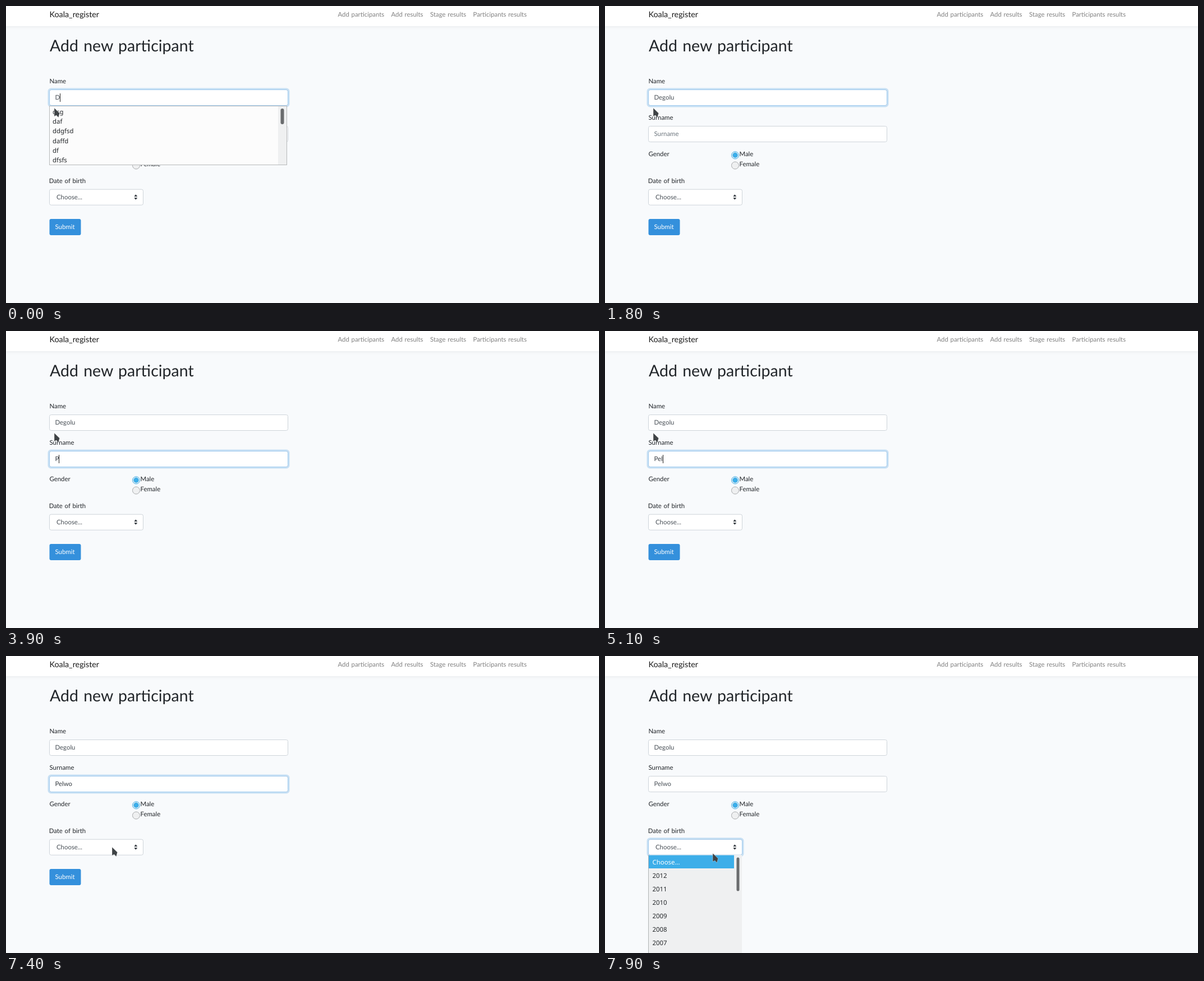
An HTML page for the animation above (8000 ms loop, 1057x530 px).

```html
<!DOCTYPE html>
<html lang="en">
<head>
<meta charset="utf-8">
<title>Add new participant</title>
<style>
html, body { margin: 0; width: 100%; height: 100%; overflow: hidden; background: #f8fafc; }
svg { display: block; }
text { font: 11.4px Lato, sans-serif; word-spacing: .07em; fill: #212529; white-space: pre; text-rendering: geometricPrecision; }
.brand { font-size: 14.3px; fill: #191919; }
.title { font-size: 28.5px; }
.nav text { fill: #808080; }
.sys text { font-family: "Noto Sans", "Open Sans", sans-serif; fill: #232629; }
.box { fill: #fff; stroke: #ced4da; }
.value { fill: #495057; }
.white, .sys .white { fill: #fff; }
.ring { fill: none; stroke: #a1cbef; }
.glow { fill: none; stroke: #3490dc; stroke-opacity: .25; stroke-width: 2.5; }
</style>
</head>
<body>
<svg width="1057" height="530" viewBox="0 0 1057 530">
  <rect width="1057" height="530" fill="#f8fafc"/>
  <rect width="1057" height="36" fill="#fff" style="filter:drop-shadow(0 2px 2px rgba(0,0,0,.05))"/>
  <text class="brand" x="77.5" y="20">Koala_register</text>
  <g class="nav">
    <text x="591.5" y="19">Add participants</text>
    <text x="686.5" y="19">Add results</text>
    <text x="756" y="19">Stage results</text>
    <text x="832.5" y="19">Participants results</text>
  </g>
  <text class="title" x="78" y="81">Add new participant</text>

  <text x="77.5" y="138">Name</text>
  <text x="77.5" y="202.5">Surname</text>
  <text x="77.5" y="267.5">Gender</text>
  <text x="239.5" y="267.5">Male</text>
  <text x="239.5" y="285.5">Female</text>
  <text x="76.7" y="315.5">Date of birth</text>
  <circle cx="232" cy="266.3" r="6.5" fill="#eff0f1" stroke="#3daee9"/>
  <circle cx="232" cy="266.3" r="4.7" fill="#3daee9"/>
  <circle cx="232" cy="284.5" r="6.5" fill="#eff0f1" stroke="#a9abad"/>

  <g id="fields"></g>
  <text class="value" id="name" x="87.5" y="167"></text>
  <text class="value" id="surname" x="87.5" y="232"></text>
  <text class="value" x="90" y="345">Choose...</text>
  <path d="M228.3 340L231.3 336.3L234.3 340ZM228.3 342L231.3 345.7L234.3 342Z" fill="#343a40"/>
  <rect id="caret" width="1" height="15" fill="#222"/>

  <rect x="77.5" y="380" width="56" height="29" rx="3" fill="#3490dc"/>
  <text class="white" x="87.5" y="398">Submit</text>

  <g class="sys" id="hints">
    <rect x="77.5" y="178.5" width="423" height="105" fill="#fcfcfc" stroke="#b7b9ba"/>
    <rect x="485" y="179" width="15" height="104" fill="#eff0f1"/>
    <rect x="489.5" y="183" width="6" height="28" rx="3" fill="#6a6c6e"/>
  </g>
  <g class="sys" id="years">
    <rect x="77" y="355" width="167" height="176" fill="#eff0f1"/>
    <rect x="77" y="355" width="1" height="176" fill="#b0b3b5"/>
    <rect x="78" y="355.5" width="152" height="23.5" fill="#3daee9"/>
    <rect x="234.5" y="359.5" width="5" height="60" rx="2.5" fill="#6a6c6e"/>
    <text class="white" x="84.5" y="371.8">Choose...</text>
  </g>
  <path id="pointer" d="M0 0V15L3.8 13L7.5 17L9.6 9.3Z" fill="#3f4346" stroke="#fff" stroke-opacity=".5" stroke-width=".7"/>
</svg>
<script>
const $ = id => document.getElementById(id);
const LOOP = 8000, TO_SURNAME = 2430, TO_YEAR = 7490;

function add(parent, tag, attrs, text = '') {
  const el = document.createElementNS('http://www.w3.org/2000/svg', tag);
  for (const key in attrs) el.setAttribute(key, attrs[key]);
  el.textContent = text;
  return parent.appendChild(el);
}

// A bordered field; returns its focus highlight.
function field(y, width) {
  const box = { x: 77.5, y, width, height: 28, rx: 3 };
  add($('fields'), 'rect', { ...box, class: 'box' });
  const focus = add($('fields'), 'g', {});
  add(focus, 'rect', { x: 75.75, y: y - 1.75, width: width + 3.5, height: 31.5, rx: 4.5, class: 'glow' });
  add(focus, 'rect', { ...box, class: 'ring' });
  return focus;
}
const nameFocus = field(149.5, 425);
const surnameFocus = field(214.5, 425);
const yearFocus = field(327.2, 167);

['dsg', 'daf', 'ddgfsd', 'daffd', 'df', 'dfsfs'].forEach((word, i) =>
  add($('hints'), 'text', { x: 83, y: 193 + i * 17.2 }, word));
for (let i = 1; i < 8; i++)
  add($('years'), 'text', { x: 84.5, y: 371.8 + i * 24.1 }, 2013 - i);

// Each track lists [start time, value].
const nameTyped = [[0, 'D'], [300, 'De'], [500, 'Deg'], [600, 'Dego'], [900, 'Degol'], [1200, 'Degolu']];
const surnameTyped = [[0, ''], [3900, 'P'], [4200, 'Pe'], [4400, 'Pel'], [4600, 'Pelo'],
  [5100, 'Pel'], [5600, 'Pelw'], [6000, 'Pelwo']];
const caretOn = [[0, 1], [1800, 0], [2500, 1], [3600, 0], [3900, 1], [4900, 0], [5100, 1], [6900, 0]];
const pointerAt = [[0, [86, 182]], [6900, [165, 304]], [7000, [173, 316]], [7100, [179, 326]],
  [7200, [184, 333]], [7300, [187, 338]], [7400, [189, 341]], [7500, [190, 343]],
  [7600, [190, 344]], [7800, [191, 348]], [7900, [192, 352]]];
const yearsShown = [[0, 0], [7600, .34], [7700, .9], [7800, .97], [7900, 1]];

const at = (track, t) => track.findLast(([start]) => t >= start)[1];
const ramp = (t, start) => Math.min(1, Math.max(0, (t - start) / 150));

function draw(now) {
  const t = Math.floor(now % LOOP / 100) * 100;
  const first = ramp(t, TO_SURNAME), second = ramp(t, TO_YEAR);
  nameFocus.style.opacity = 1 - first;
  surnameFocus.style.opacity = first - second;
  yearFocus.style.opacity = second;

  const surname = at(surnameTyped, t), active = first > second;
  $('name').textContent = at(nameTyped, t);
  $('surname').textContent = surname || 'Surname';
  $('surname').style.fill = surname ? (active ? '#343a40' : '#495057') : (active ? '#50575e' : '#6c757d');

  const input = first ? $('surname') : $('name');
  const typedWidth = first && !surname ? 0 : input.getComputedTextLength();
  $('caret').setAttribute('x', Math.round(87.5 + typedWidth));
  $('caret').setAttribute('y', first ? 221 : 156);
  $('caret').style.opacity = at(caretOn, t);

  $('hints').style.opacity = t < 300 ? 1 : 0;
  $('years').style.opacity = at(yearsShown, t);
  $('pointer').setAttribute('transform', `translate(${at(pointerAt, t)})`);
}

const begin = performance.now();
function tick() {
  draw(performance.now() - begin);
  requestAnimationFrame(tick);
}
tick();
</script>
</body>
</html>
```
